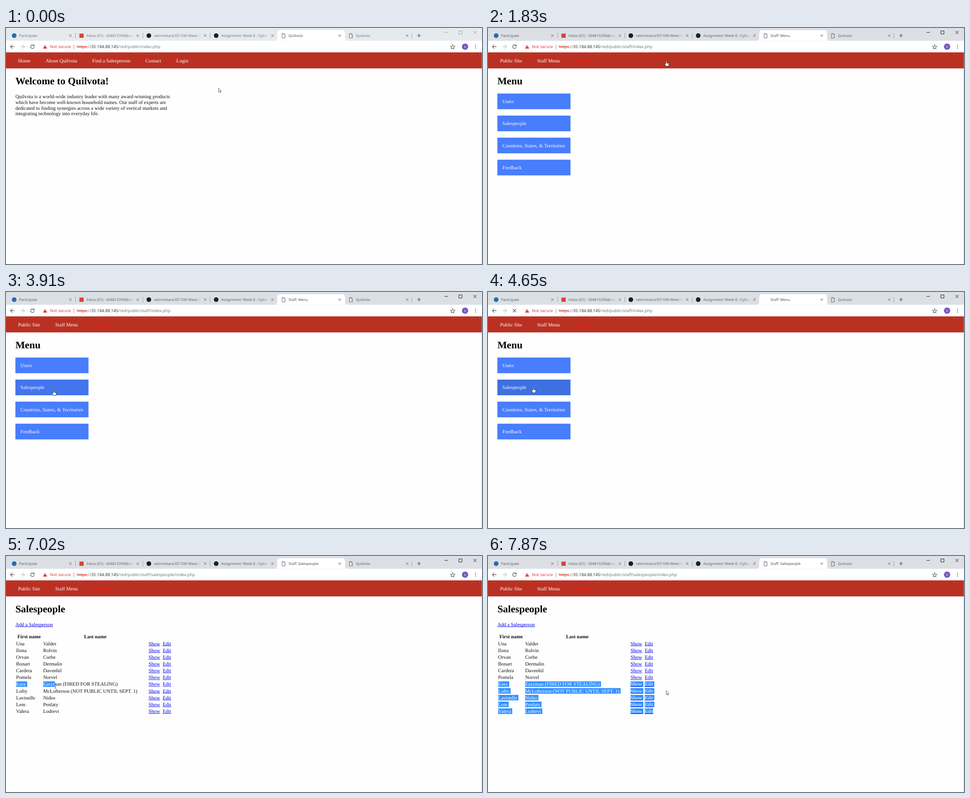
Write an HTML page that moves like this. It is 1060 by 528 pixels and loops after 7990 ms.

```html
<!DOCTYPE html>
<html lang="en">
<head>
<meta charset="utf-8">
<title>Browser session</title>
<style>
  html, body { margin: 0; width: 100%; height: 100%; overflow: hidden; background: #fefefe; }
  svg { display: block; width: 1060px; height: 528px; text-rendering: geometricPrecision;
    --strip: #e7eaed; --tab: #6a6e73; --win: #9a9c9f; }
  svg.focused { --strip: #dcdfe4; --tab: #565a5f; --win: #151515; }
  text { white-space: pre; }
  .ui { font-family: "Open Sans", "Noto Sans", sans-serif; font-size: 8.1px; }
  .bar { font-size: 9.25px; }
  .page { font-family: "Liberation Serif", "Times New Roman", serif; font-size: 11.22px; }
  .h1 { font-size: 22.42px; font-weight: bold; }
  .th { font-weight: bold; }
  .strip { fill: var(--strip); }
  .tab { fill: var(--tab); }
  .win { fill: none; stroke: var(--win); }
  .icon { fill: none; stroke: #5f6368; }
  .fade0 { stop-color: var(--tab); }
  .fade1 { stop-color: var(--tab); stop-opacity: 0; }
</style>
</head>
<body>
<svg id="stage" viewBox="0 0 1060 528">
  <defs>
    <linearGradient id="fade" gradientUnits="userSpaceOnUse" x1="116" x2="131" y1="0" y2="0">
      <stop class="fade0" offset="0"/><stop class="fade1" offset="1"/>
    </linearGradient>
    <clipPath id="picked"></clipPath>
    <path id="doc" class="icon" d="M-3.3-4.9H.9L3.4-2.4V4.9H-3.3ZM.9-4.9V-2.4H3.4"/>
    <path id="close" class="icon" d="M-2.7-2.7L2.7 2.7M2.7-2.7L-2.7 2.7"/>
  </defs>

  <g class="ui">
    <rect class="strip" width="1060" height="29"/>
    <path fill="#fff" d="M598 28.6Q604 28.6 604 22.6V11Q604 5 610 5H749Q755 5 755 11V22.6Q755 28.6 761 28.6Z"/>
    <rect y="28.6" width="1060" height="26.4" fill="#fff"/>
    <g id="tabs"></g>
    <path id="spinner" fill="none" stroke="#9b9ea2" stroke-width="1.1"/>
    <path d="M915.3 17H923.9M919.6 12.7V21.3" stroke="#46494d" stroke-width="1.2"/>
    <path class="win" d="M976.5 9.8H984M1008.5 6.5H1015.5V13.3H1008.5ZM1041 6.3L1048 13.3M1048 6.3L1041 13.3"/>
  </g>

  <g class="ui bar">
    <path d="M19 41.7H10M14.2 37.3L9.8 41.7L14.2 46.1" fill="none" stroke="#55585c" stroke-width="1.2"/>
    <path d="M32 41.7H41M36.8 37.3L41.2 41.7L36.8 46.1" fill="none" stroke="#bcbec1" stroke-width="1.2"/>
    <g id="reload">
      <path d="M62 38.9A4.1 4.1 0 1 0 63 42.9" fill="none" stroke="#505357" stroke-width="1.2"/>
      <path d="M63.4 37.2V41H59.6Z" fill="#505357"/>
    </g>
    <path id="stop" d="M55.3 38L62.7 45.4M62.7 38L55.3 45.4" stroke="#505357" stroke-width="1.2"/>
    <path d="M87 38L91.6 46H82.4Z" fill="#d3302a"/>
    <path d="M87 40.7V43.2M87 44V45" stroke="#fff" stroke-width=".9"/>
    <text x="98" y="45.3" fill="#d3302a">Not secure</text>
    <rect x="150.8" y="37" width="1" height="10" fill="#8d8f92"/>
    <text x="158" y="45.3" fill="#6a6d71"><tspan fill="#d3302a">https</tspan>://<tspan fill="#26282b">35.184.88.145</tspan><tspan id="path"></tspan></text>
    <rect x="157.5" y="41.7" width="23.5" height=".9" fill="#d3302a"/>
    <path d="M994.6 37.4L996 40.7L999.6 41L996.9 43.3L997.7 46.8L994.6 45L991.5 46.8L992.3 43.3L989.6 41L993.2 40.7Z" class="icon" stroke-width="1.1"/>
    <circle cx="1022.3" cy="41.8" r="7" fill="#7a55c0"/>
    <text x="1022.3" y="44.6" text-anchor="middle" font-size="7.5" fill="#fff">V</text>
    <path d="M1045.6 38.2h.01M1045.6 41.8h.01M1045.6 45.4h.01" stroke="#505357" stroke-width="1.9" stroke-linecap="round"/>
  </g>

  <g class="page">
    <rect y="54.5" width="1060" height="35.9" fill="#ba3123"/>
    <g id="home"></g>
    <g id="staff"></g>
    <g id="menu"></g>
    <g id="people"></g>
  </g>
  <rect x="1059" y="55" width="1" height="473" fill="#a8a8a8" opacity=".6"/>

  <g id="cursor">
    <path id="arrow" d="M.3 .3V9.6L2.4 7.6L3.8 10.9L5.2 10.3L3.8 7.1H6.7Z" fill="#fff" stroke="#333" stroke-width=".75"/>
    <path id="hand" d="M-1 7.6V1.3A1 1 0 0 1 1 1.3V5L4.9 5.9A1.2 1.2 0 0 1 5.9 7.2L5.5 10.4L4.8 12.6H-.4L-3.2 8.3A1 1 0 0 1-1.8 6.9Z" fill="#fff" stroke="#222" stroke-width=".85"/>
    <path id="beam" d="M-2-4.9Q0-4.9 0-4Q0-4.9 2-4.9M0-4V4M-2 4.9Q0 4.9 0 4Q0 4.9 2 4.9" fill="none" stroke="#333" stroke-width=".8"/>
  </g>
</svg>
<script>
const LOOP = 7990;
const $ = id => document.getElementById(id);
const show = (id, on) => { $(id).style.visibility = on ? "visible" : "hidden"; };

function add(parent, tag, attrs, content) {
  const el = document.createElementNS("http://www.w3.org/2000/svg", tag);
  for (const k in attrs) el.setAttribute(k, attrs[k]);
  if (content) el.textContent = content;
  return parent.appendChild(el);
}
const label = (parent, x, y, content, fill = "#111", cls = "") =>
  add(parent, "text", { x, y, fill, class: cls }, content);

function link(parent, x, y, content, fill = "#0000ee") {
  const el = label(parent, x, y, content, fill);
  add(parent, "rect", { x, y: y + 1, width: el.getComputedTextLength(), height: .9, fill: "#0000e0" });
  return el;
}

// Tabs
const names = ["Participate", "Inbox (67) - 004815390@coll", "velomistara/IST-590-Week-8",
  "Assignment: Week 8 - Cybers", "Quilvota", "Quilvota"];
const marks = [["circle", "#1f6fb5"], ["square", "#d5473b"], ["circle", "#1c1f23"], ["circle", "#10262b"]];
let title, docIcon;
names.forEach((name, i) => {
  const g = add($("tabs"), "g", { transform: `translate(${i * 149.95 + 4.5})` });
  const [shape, color] = marks[i] || [];
  if (shape === "circle") add(g, "circle", { cx: 13.7, cy: 17, r: 5.2, fill: color });
  else if (shape) add(g, "rect", { x: 9, y: 12.5, width: 9.5, height: 9.5, fill: color });
  else {
    const icon = add(g, "use", { href: "#doc", x: 13.8, y: 17.3 });
    if (i === 4) docIcon = icon;
  }
  const t = label(g, 24.8, 20, name, i === 4 ? "#3f4246" : "url(#fade)");
  if (i === 4) title = t;
  add(g, "use", { href: "#close", x: 139, y: 17 });
  if (i && i < 4) add(g, "rect", { x: -.2, y: 11, width: 1, height: 12, fill: "#9fa2a7" });
});
add($("tabs"), "rect", { x: 903.4, y: 11, width: 1, height: 12, fill: "#9fa2a7" });

// Home page
const nav = (g, items) => items.forEach(([x, s, fill = "#fff"]) => label(g, x, 76.9, s, fill));
nav($("home"), [[27, "Home"], [88.2, "About Quilvota"], [192.1, "Find a Salesperson"], [310.6, "Contact"], [379.3, "Login"]]);
label($("home"), 20.9, 126, "Welcome to Quilvota!", "#000", "h1");
["Quilvota is a world-wide industry leader with many award-winning products",
  "which have become well-known household names. Our staff of experts are",
  "dedicated to finding synergies across a wide variety of vertical markets and",
  "integrating technology into everyday life."
].forEach((s, i) => label($("home"), 20.9, 156.8 + i * 12.85, s));

// Staff pages
nav($("staff"), [[27, "Public Site"], [109.6, "Staff Menu"], [195, "Log out", "#fb0d0d"]]);
label($("menu"), 20.9, 126, "Menu", "#000", "h1");
const buttons = ["Users", "Salespeople", "Countries, States, & Territories", "Feedback"].map((s, i) => {
  const y = 146.6 + i * 49.35;
  const box = add($("menu"), "rect", { x: 20.9, y, width: 162.8, height: 35.1 });
  label($("menu"), 32, y + 21.2, s, "#fff");
  return box;
});

const people = ["Una,Valder", "Ilona,Rolvin", "Orvan,Corbe", "Bonart,Dermalin", "Cardera,Davenhil", "Pomela,Norvel",
  "Easy,Easyman (FIRED FOR STEALING)", "Lofty,McLofterson (NOT PUBLIC UNTIL SEPT. 1)",
  "Lavinelle,Nidso", "Lem,Penlaty", "Valera,Lodrevi"].map(s => [...s.split(","), "Show", "Edit"]);
const cols = [22.6, 82.7, 317.5, 348.9];
const rowY = r => 199.6 + r * 15.14;
const FIRST = 6;

label($("people"), 20.9, 126, "Salespeople", "#000", "h1");
link($("people"), 20.9, 156.8, "Add a Salesperson");
label($("people"), 25.5, 184.4, "First name", "#111", "th");
label($("people"), 173.8, 184.4, "Last name", "#111", "th");

// The selection is a white copy of the rows over blue, clipped to the picked cells.
const glow = add($("people"), "g");
const cells = [];
people.forEach((row, r) => row.forEach((s, c) => {
  const put = c < 2 ? label : link;
  const el = put($("people"), cols[c], rowY(r), s);
  if (r < FIRST) return;
  cells.push({ r, c, w: el.getComputedTextLength(),
    rect: add($("picked"), "rect", { x: cols[c], y: rowY(r) - 10, height: 12.4, width: 0 }) });
}));
$("people").append(glow);
glow.setAttribute("clip-path", "url(#picked)");
add(glow, "rect", { x: 20, y: 275, width: 355, height: 85, fill: "#3390ff" });
people.forEach((row, r) => r >= FIRST && row.forEach((s, c) =>
  (c < 2 ? label : link)(glow, cols[c], rowY(r), s, "#fff")));

function select(last, edge) {
  for (const { r, c, w, rect } of cells) {
    const full = r === 10 && c === 3 ? w : w + 2.8;
    const width = r < last ? full : r > last ? 0 : Math.max(0, Math.min(full, edge - cols[c]));
    rect.setAttribute("width", width);
  }
}

// Timelines: each entry holds until the next one
const moves = [
  [0, "arrow", 473, 134], [280, "arrow", 459, 123], [430, "arrow", 424, 81.5],
  [580, "arrow", 408, 76], [700, "hand", 399, 74], [820, "hand", 397, 73],
  [2700, "arrow", 314.5, 87], [2850, "arrow", 222, 104], [2970, "arrow", 156.5, 113],
  [3120, "arrow", 142, 104], [3240, "arrow", 133, 88], [3390, "arrow", 127, 85], [3520, "arrow", 122.5, 114],
  [3670, "hand", 117, 152], [3790, "arrow", 108, 241], [3910, "hand", 106, 219], [4060, "hand", 100.5, 213],
  [5790, "beam", 90, 250.5], [5940, "beam", 68, 266], [6060, "beam", 44, 280], [6180, "beam", 30, 287], [6300, "beam", 26, 288],
  [7020, "beam", 110, 291], [7140, "beam", 191, 295], [7290, "beam", 223, 298.5],
  [7440, "beam", 262, 302], [7560, "beam", 297, 302], [7720, "arrow", 362, 298], [7870, "arrow", 396.5, 300.7]
];
const picks = [[0, 0, 0], [7020, 6, 109], [7140, 6, 189], [7290, 7, 213], [7440, 7, 251],
  [7560, 7, 300], [7720, 7, 380], [7870, 10, 380]];
const pages = [[0, "home", "Quilvota", "/red/public/index.php"],
  [1830, "menu", "Staff: Menu", "/red/public/staff/index.php"],
  [4770, "people", "Staff: Salespeople", "/red/public/staff/salespeople/index.php"]];
const loads = [[0, 0], [1280, 12], [1400, 38], [1520, 65], [1680, 92], [1830, 0], [4650, 12], [4770, 0]];
const hovers = [[0, -1], [3670, 0], [3790, -1], [3910, 1]];
const at = (list, t) => list.findLast(e => e[0] <= t);

function render(t) {
  $("stage").classList.toggle("focused", t >= 1130);

  const [, page, name, path] = at(pages, t);
  for (const id of ["home", "menu", "people"]) show(id, id === page);
  show("staff", page !== "home");
  title.textContent = name;
  $("path").textContent = path;

  const arc = at(loads, t)[1], a = arc * Math.PI / 180;
  show("reload", !arc);
  show("stop", arc);
  show("spinner", arc);
  docIcon.style.visibility = arc ? "hidden" : "visible";
  $("spinner").setAttribute("d", `M618.3 12.8A4.4 4.4 0 0 0 ${618.3 - 4.4 * Math.sin(a)} ${17.2 - 4.4 * Math.cos(a)}`);

  const over = at(hovers, t)[1];
  buttons.forEach((b, i) => b.setAttribute("fill", i !== over ? "#487dfc" : t >= 4370 ? "#3f70e0" : "#4375ec"));
  select(...at(picks, t).slice(1));

  const [, shape, x, y] = at(moves, t);
  for (const id of ["arrow", "hand", "beam"]) show(id, id === shape);
  $("cursor").setAttribute("transform", `translate(${x} ${y})`);
}

const start = performance.now();
function tick() {
  render((performance.now() - start) % LOOP);
  requestAnimationFrame(tick);
}
tick();
</script>
</body>
</html>
```
